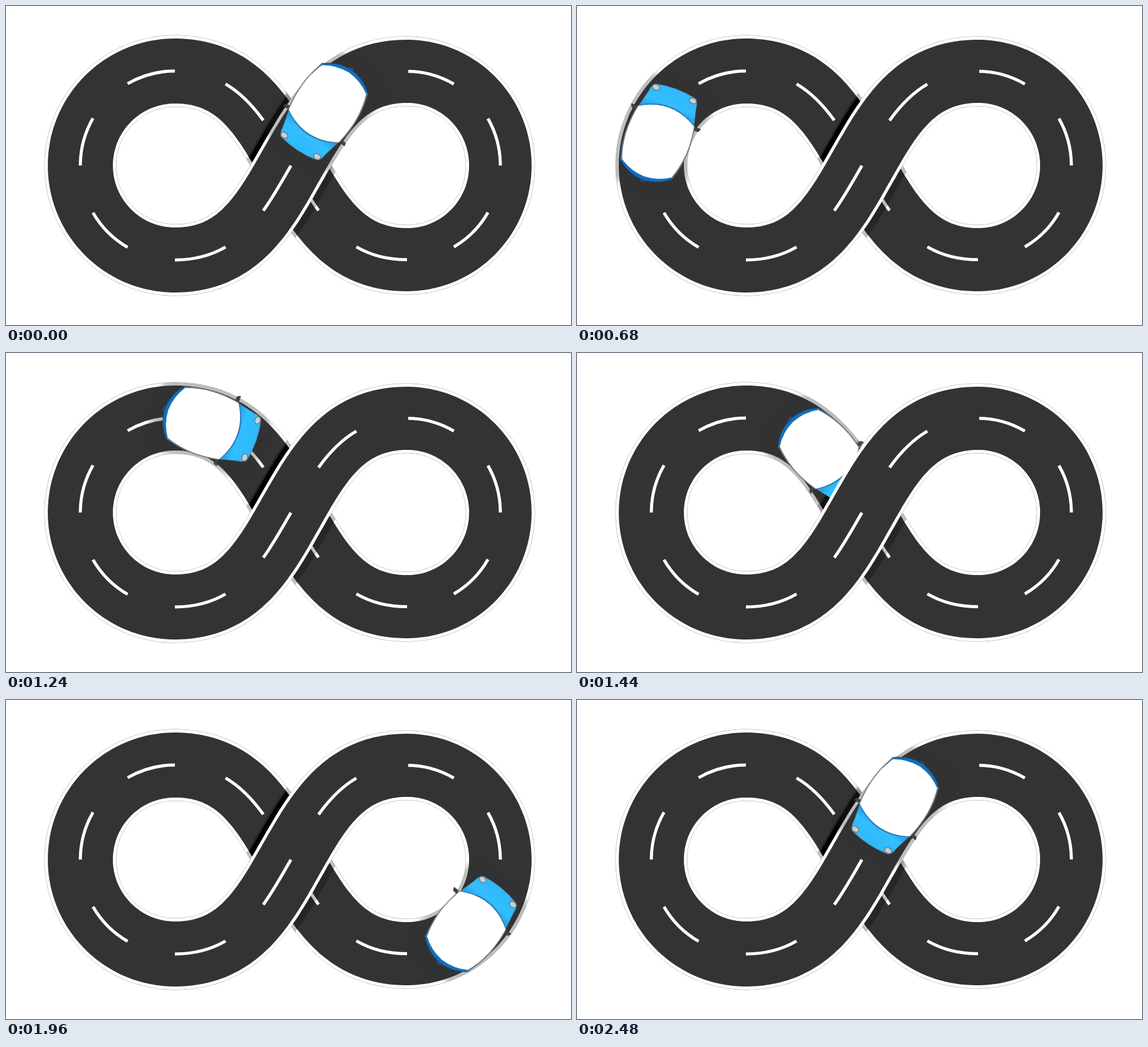
Animation, 920 px wide and 520 px high, one loop 2520 ms. Source, as an HTML page:

```html
<!DOCTYPE html>
<html lang="en">
<head>
<meta charset="utf-8">
<title>Endless road</title>
<style>
html, body { margin: 0; width: 100%; height: 100%; overflow: hidden; background: #fff; }
svg { display: block; }
</style>
</head>
<body>
<svg id="stage" width="920" height="520" viewBox="0 0 920 520">
  <defs>
    <filter id="soft" x="-20%" y="-20%" width="140%" height="140%"><feGaussianBlur stdDeviation="4"/></filter>
    <linearGradient id="paint" x1="0" x2="1" y1="0" y2="0">
      <stop offset="0" stop-color="#2390da"/>
      <stop offset=".4" stop-color="#33beff"/>
      <stop offset="1" stop-color="#30b8fa"/>
    </linearGradient>
    <clipPath id="onRoad"></clipPath>
    <clipPath id="onLower"></clipPath>
    <clipPath id="onTar"></clipPath>
  </defs>
  <rect width="920" height="520" fill="#fff"/>
  <g id="lower"></g>
  <g id="carLow">
    <g id="car">
      <g clip-path="url(#onRoad)">
        <rect class="pose" x="-96" y="-68" width="186" height="136" rx="34" fill="#333" opacity=".32" filter="url(#soft)"/>
      </g>
      <g class="pose">
        <path d="M-62-45Q-79-26-80 0Q-79 26-62 45L-40 49L-40-49Z" fill="#146fb9" stroke="#0d4a86"/>
        <rect x="-83" y="-4" width="4" height="8" rx="1" fill="#2a4d70"/>
        <g fill="#444" stroke="#222" stroke-width=".6">
          <path d="M24-49L25-58L30-60L30-52Z"/>
          <path d="M24 49L25 58L30 60L30 52Z"/>
        </g>
        <path d="M30-48L59-41Q71-40 74-34Q81 0 74 34Q71 40 59 41L30 48Z" fill="url(#paint)" stroke="#4a8fb5"/>
        <path d="M31-47Q61 0 31 47" fill="none" stroke="#2a78b0" stroke-width="2.5"/>
        <path d="M-60-43Q-20-58 30-49Q60 0 30 49Q-20 58-60 43Q-73 24-74 0Q-73-24-60-43Z" fill="#fff"/>
        <path d="M-62-44Q-20-59 31-49M-62 44Q-20 59 31 49" fill="none" stroke="#777" stroke-width="1.6"/>
        <g fill="#c9d0d4" stroke="#6d7a82" stroke-width="1.4">
          <ellipse cx="69" cy="-32" rx="4.5" ry="6"/>
          <ellipse cx="69" cy="32" rx="4.5" ry="6"/>
        </g>
      </g>
    </g>
  </g>
  <g id="upper"></g>
  <g id="carHigh"></g>
</svg>
<script>
const $ = id => document.getElementById(id);

function add(parent, tag, attrs) {
  const el = document.createElementNS("http://www.w3.org/2000/svg", tag);
  for (const k in attrs) el.setAttribute(k, attrs[k]);
  parent.appendChild(el);
  return el;
}

// Centre line: bridge, left loop, underpass, right loop
const parts = [
  ["653 106.5", "C548 106.5 507 185 464 260S380 414 275 414"],
  ["275 414", "A154 154 0 0 1 275 106"],
  ["275 106", "C380 106 421 185 464 260S548 413.5 653 413.5"],
  ["653 413.5", "A152 153.5 0 0 0 653 106.5"]
];
const shape = i => "M" + parts[i].join("");
const line = add($("stage"), "path", { fill: "none" });

// Where each part ends along the line
let sum = 0;
const [bridge, under, right, total] = parts.map((p, i) => {
  line.setAttribute("d", shape(i));
  return sum += line.getTotalLength();
});
line.setAttribute("d", "M" + parts[0][0] + parts.map(p => p[1]).join(""));

function at(s) {
  const wrap = v => ((v % total) + total) % total;
  const p = line.getPointAtLength(wrap(s));
  const a = line.getPointAtLength(wrap(s - 1));
  const b = line.getPointAtLength(wrap(s + 1));
  return { x: p.x, y: p.y, dir: Math.atan2(b.y - a.y, b.x - a.x) };
}

function shift(p, d) {
  return [p.x - Math.sin(p.dir) * d, p.y + Math.cos(p.dir) * d];
}

// Points beside the centre line; side 1 is right of travel
function edge(from, to, side, extra) {
  const pts = [];
  const n = Math.ceil((to - from) / 5);
  for (let i = 0; i <= n; i++) {
    const p = at(from + (to - from) * i / n);
    const half = 53 - Math.max(0, p.x - 275) / 250;
    pts.push(shift(p, side * (half + extra)).map(v => v.toFixed(1)).join(" "));
  }
  return pts;
}

function band(from, to, right, left = right) {
  const pts = edge(from, to, 1, right).concat(edge(from, to, -1, left).reverse());
  return "M" + pts.join("L") + "Z";
}

const tar = "#333";
const low = $("lower"), high = $("upper");
const upBorder = band(-1, bridge + 1, 5), upTar = band(-2, bridge + 2, 0);
const lowBorder = band(bridge - 1, total + 1, 5), lowTar = band(bridge - 2, total + 2, 0);

function dashes(parent, i) {
  add(parent, "path", {
    d: shape(i), fill: "none", stroke: "#fff", "stroke-width": 5,
    pathLength: 6, "stroke-dasharray": 1, "stroke-dashoffset": 1
  });
}

function hairline(from, to) {
  for (const side of [1, -1])
    add(low, "path", {
      d: "M" + edge(from, to, side, 5).join("L"),
      fill: "none", stroke: "#999", "stroke-width": 1
    });
}

hairline(0, bridge);
hairline(bridge, total);
add(low, "path", { d: lowBorder, fill: "#fff" });
add(low, "path", { d: lowTar, fill: tar });
[1, 2, 3].forEach(i => dashes(low, i));

// Shade the bridge throws on the underpass
add($("onLower"), "path", { d: band(under + 100, right - 100, 5) });
add($("onTar"), "path", { d: band(under + 100, right - 100, 0) });
add(low, "path", { d: band(80, bridge - 80, 16), opacity: .25, "clip-path": "url(#onLower)" });
add(low, "path", { d: band(80, bridge - 80, 13, 0), "clip-path": "url(#onTar)" });

add(high, "path", { d: upBorder, fill: "#fff" });
add(high, "path", { d: upTar, fill: tar });
dashes(high, 0);
add($("onRoad"), "path", { d: upBorder });
add($("onRoad"), "path", { d: lowBorder });

// time, distance, sideways offset, extra turn in degrees
const lap = 2480;
const keys = [
  [0, 154, 3, -6], [360, bridge + 90, 7, 0], [560, bridge + 228, 5, 0],
  [1000, bridge + 455, 3, 1], [1120, under + 18, 2, 0], [1440, under + 146, 0, -3],
  [1680, under + 398, -6, -2], [1760, right - 54, -10, -2],
  [2160, right + 300, 2, -9], [2240, right + 379, 2, -8],
  [lap, total + 154, 3, -6]
];
const last = keys.length - 1;

function slope(i, c) {
  const rate = j => (keys[j + 1][c] - keys[j][c]) / (keys[j + 1][0] - keys[j][0]);
  const before = rate(i ? i - 1 : last - 1), after = rate(i < last ? i : 0);
  return before * after > 0 ? 2 * before * after / (before + after) : 0;
}

function value(t, c) {
  let i = 0;
  while (i < last - 1 && t >= keys[i + 1][0]) i++;
  const a = keys[i], b = keys[i + 1], w = b[0] - a[0], u = (t - a[0]) / w;
  const h = u * u * (3 - 2 * u);
  return a[c] + (b[c] - a[c]) * h
    + w * u * (1 - u) * ((1 - u) * slope(i, c) - u * slope(i + 1, c));
}

const car = $("car"), poses = car.querySelectorAll(".pose");

function draw(ms) {
  const t = Math.min(lap, Math.floor((ms % 2520) / 40) * 40);
  const p = at(value(t, 1));
  const [x, y] = shift(p, value(t, 2));
  const turn = p.dir * 180 / Math.PI + value(t, 3);
  poses.forEach(el => el.setAttribute("transform", `translate(${x} ${y}) rotate(${turn})`));
  const layer = t > 1100 && t < 1740 ? $("carLow") : $("carHigh");
  if (car.parentNode !== layer) layer.appendChild(car);
}

let start;
function tick(now) {
  if (start === undefined) start = now;
  draw(now - start);
  requestAnimationFrame(tick);
}
draw(0);
requestAnimationFrame(tick);
</script>
</body>
</html>
```
